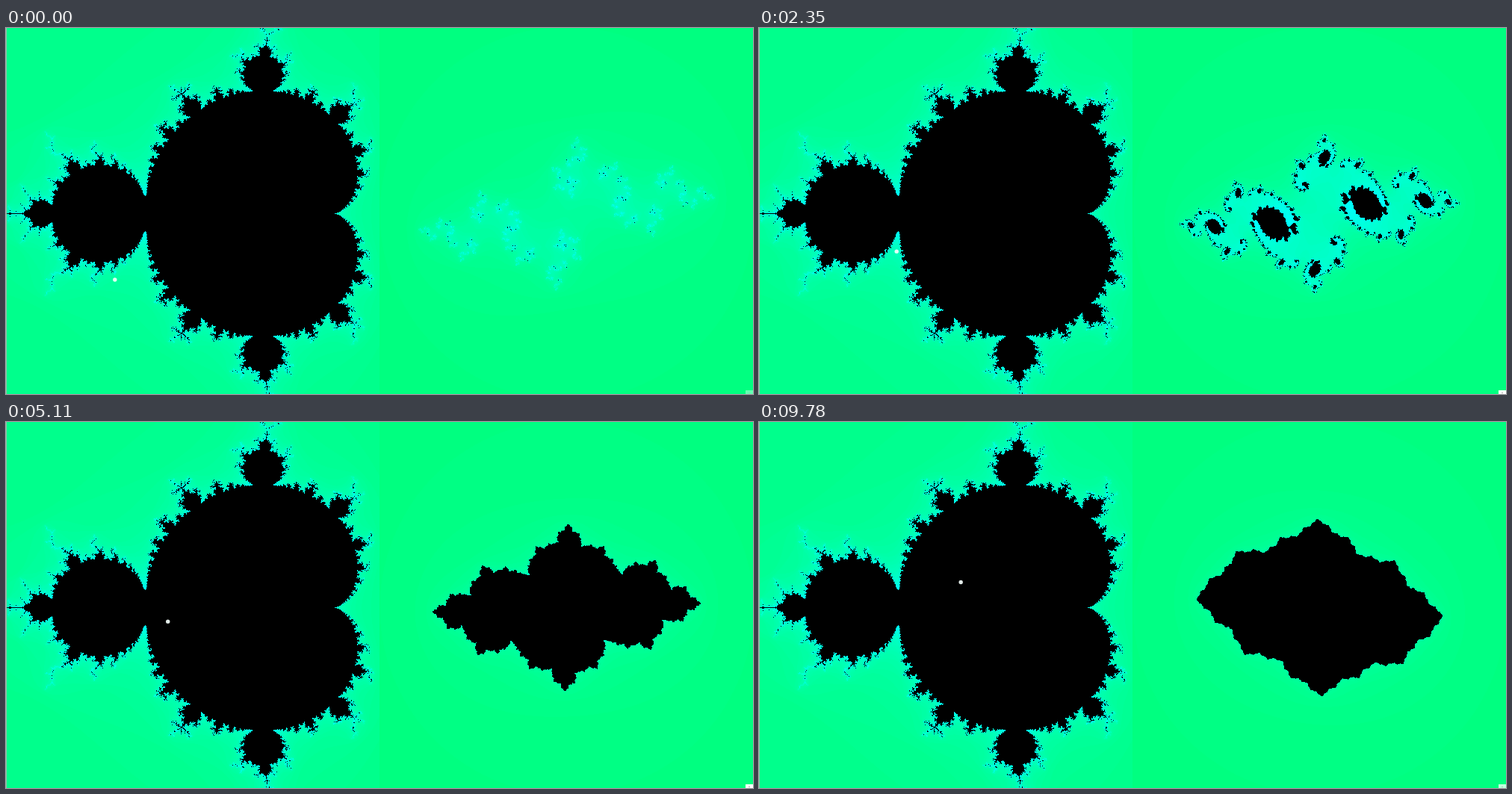
An HTML page with a canvas for the animation above (9820 ms loop, 1000x490 px).

```html
<!DOCTYPE html>
<html lang="en">
<head>
<meta charset="utf-8">
<title>Mandelbrot and Julia</title>
<style>
  html, body { margin: 0; width: 100%; height: 100%; overflow: hidden; background: #00ff80; }
  canvas { display: block; }
</style>
</head>
<body>
<canvas id="stage" width="1000" height="490"></canvas>
<script>
const W = 500, H = 490, AXIS_Y = 248;
const LOOP = 9820, MAX_ITER = 32;
const M_SCALE = 250, M_X = 375;
const J_SCALE = 125, J_X = 250;
const ctx = document.getElementById('stage').getContext('2d');

// Marker path: x at given times
const KEYS = [
  [0, 145.8], [960, 163.8], [2100, 180.8], [3180, 195.8], [4360, 209.8],
  [5410, 221.8], [6460, 234.8], [7520, 247.8], [8680, 259.8], [9780, 270.2]
];
// The picture advances in steps: first, last, count
const RUNS = [
  [20, 960, 9], [1080, 1520, 4], [1650, 2100, 5], [2210, 3180, 8],
  [3360, 4360, 8], [4520, 5410, 7], [5570, 6460, 7], [6620, 7520, 7],
  [7700, 8680, 7], [8820, 9780, 7]
];
const STEPS = [0];
for (const [a, b, n] of RUNS) {
  for (let i = 0; i < n; i++) STEPS.push(Math.floor(a + (b - a) * i / (n - 1)));
}

function markerAt(t) {
  let k = 0;
  while (k < KEYS.length - 2 && t > KEYS[k + 1][0]) k++;
  const [t0, x0] = KEYS[k], [t1, x1] = KEYS[k + 1];
  const x = x0 + (x1 - x0) * (t - t0) / (t1 - t0);
  return { x, y: 337 - 0.985 * (x - KEYS[0][1]) };
}

function escapeTime(zx, zy, cx, cy) {
  for (let n = 0; n < MAX_ITER; n++) {
    const xx = zx * zx, yy = zy * zy;
    if (xx + yy > 4) return n;
    zy = 2 * zx * zy + cy;
    zx = xx - yy + cx;
  }
  return MAX_ITER;
}

const pack = (r, g, b) => (255 << 24 | b << 16 | g << 8 | r) >>> 0;
const PALETTE = new Uint32Array(MAX_ITER + 1);
for (let n = 0; n < MAX_ITER; n++) PALETTE[n] = pack(0, 255, 128 + 4 * n);
PALETTE[MAX_ITER] = pack(0, 0, 0);

function plot(image, originX, scale, iterate) {
  const px = new Uint32Array(image.data.buffer);
  for (let y = 0, i = 0; y < H; y++) {
    const im = (y - AXIS_Y) / scale;
    for (let x = 0; x < W; x++) px[i++] = PALETTE[iterate((x - originX) / scale, im)];
  }
}

const mandel = ctx.createImageData(W, H);
const julia = ctx.createImageData(W, H);
plot(mandel, M_X, M_SCALE, (x, y) => escapeTime(0, 0, x, y));

function drawCorner(t) {
  const fadeIn = 0.4 + 0.6 * t / 1200;
  const fadeOut = 1 - 0.25 * (t - 8820) / 960;
  ctx.globalAlpha = Math.max(0, Math.min(1, fadeIn, fadeOut));
  ctx.fillStyle = '#fff';
  ctx.fillRect(990, 485, 10, 5);
  ctx.fillStyle = '#aaa';
  ctx.fillRect(994, 488, 2, 1);
  ctx.globalAlpha = 1;
}

function draw(t) {
  const p = markerAt(t);
  const cx = (p.x - M_X) / M_SCALE, cy = (p.y - AXIS_Y) / M_SCALE;
  plot(julia, J_X, J_SCALE, (x, y) => escapeTime(x, y, cx, cy));
  ctx.putImageData(mandel, 0, 0);
  ctx.putImageData(julia, W, 0);

  ctx.fillStyle = '#92c4aa';
  ctx.fillRect(0, 0, 1, H);

  ctx.fillStyle = 'rgba(245, 255, 252, 0.92)';
  ctx.beginPath();
  ctx.arc(p.x, p.y, 2.7, 0, Math.PI * 2);
  ctx.fill();
  drawCorner(t);
}

let shown = -1;
const start = performance.now();
function tick() {
  const t = (performance.now() - start) % LOOP;
  let s = STEPS.length - 1;
  while (s > 0 && STEPS[s] > t) s--;
  if (s !== shown) {
    shown = s;
    draw(STEPS[s]);
  }
  requestAnimationFrame(tick);
}
tick();
</script>
</body>
</html>
```
